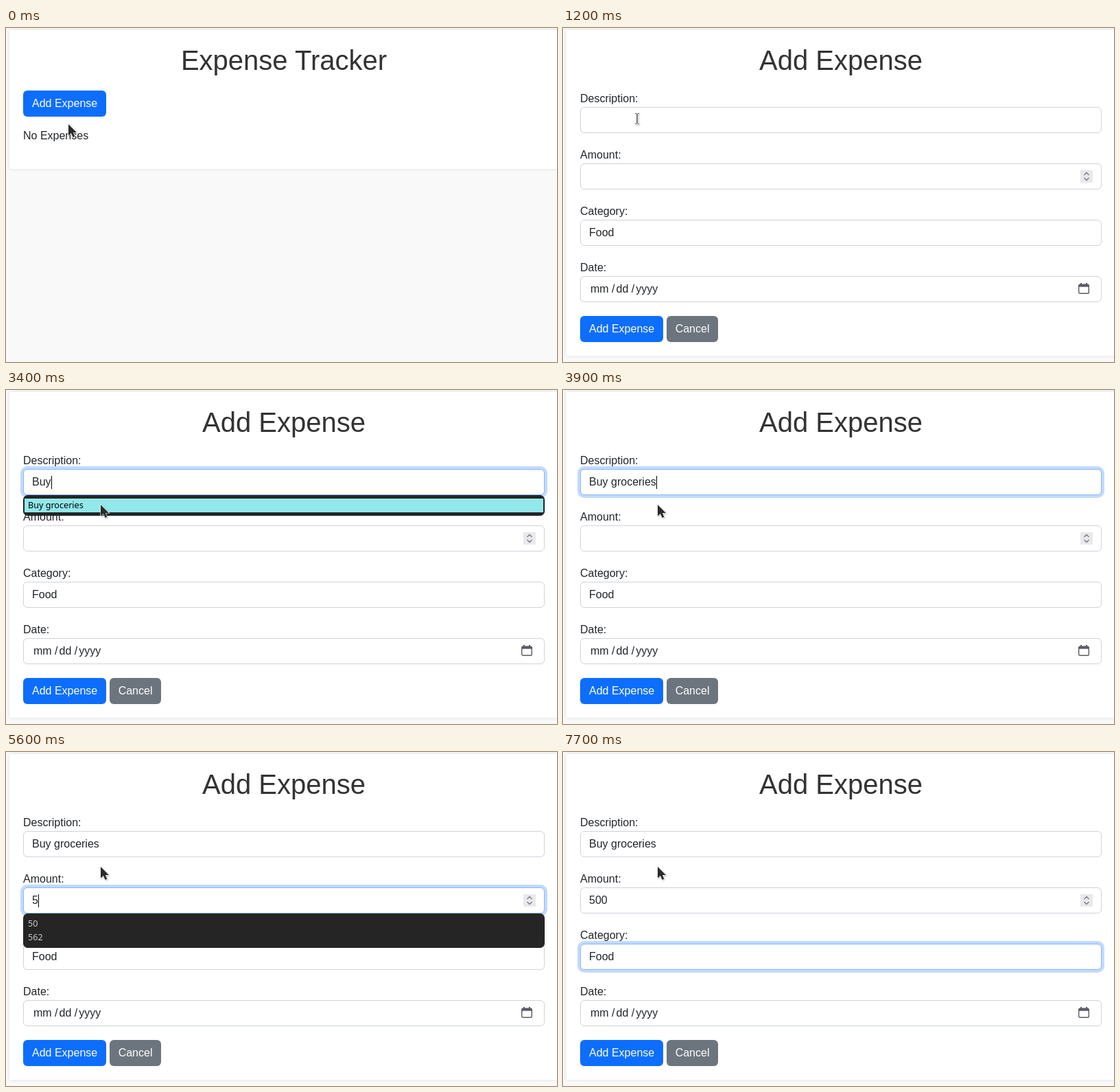
These frames come from a looping animation (803 px wide and 486 px high, 8 s). An HTML page:

```html
<!DOCTYPE html>
<html lang="en">
<head>
<meta charset="utf-8">
<title>Expense Tracker</title>
<style>
* { box-sizing: border-box; }
html, body { margin: 0; width: 100%; height: 100%; overflow: hidden; }
body {
  position: relative; background: #f9f9f9; color: #212529;
  font: 16px/24px "Liberation Sans", Arial, sans-serif;
}
.card {
  position: absolute; left: 5px; top: 3px; width: 800px; padding: 20px;
  background: #fff; box-shadow: 0 0 5px rgba(0, 0, 0, .1);
}
h1 { margin: 0 0 20px; font-size: 40px; line-height: 48px; font-weight: 400; color: #333; text-align: center; }
p { margin: 16px 0; }
.row { height: 38px; white-space: nowrap; }
.btn {
  display: inline-block; height: 38px; padding: 7px 13px; border-radius: 6px;
  background: #0d6efd; color: #fff; vertical-align: top;
}
.grey { background: #6c757d; }
.field {
  position: relative; display: flex; align-items: center; height: 38px; margin-bottom: 20px;
  padding: 0 12px; border: 1px solid #ced4da; border-radius: 6px; background: #fff; white-space: pre;
}
.caret { width: 1px; height: 19px; margin-top: 1px; background: #000; visibility: hidden; }
.slash { margin: 0 2px 0 4.4px; }
.icon { position: absolute; overflow: visible; }
.popup {
  position: absolute; left: 25px; width: 760px; padding: 5px 2px; border-radius: 7px;
  background: #252526; box-shadow: 0 0 1px rgba(0, 0, 0, .5);
  font: 12.6px/20px "Noto Sans", "Open Sans", sans-serif; color: #ccc;
}
.popup div { height: 20px; padding-left: 5px; line-height: 19px; }
.popup .on { background: #92e8ea; color: #000; }
.cursor { position: absolute; left: 0; top: 0; overflow: visible; filter: drop-shadow(1px 1px 1px rgba(0, 0, 0, .25)); }
</style>
</head>
<body>
<div class="card" id="home">
  <h1>Expense Tracker</h1>
  <div class="row"><span class="btn" id="add">Add Expense</span></div>
  <p>No Expenses</p>
</div>

<div class="card" id="form">
  <h1>Add Expense</h1>
  <div>Description:</div>
  <div class="field"><span></span><i class="caret"></i></div>
  <div>Amount:</div>
  <div class="field"><span></span><i class="caret"></i>
    <svg class="icon" style="left:728px;top:9px" width="18" height="18" fill="none" stroke="#77777c" stroke-width="1.3">
      <rect width="18" height="18" fill="#e9e9ed" stroke="none"/>
      <path d="M5.5 7 9 3.5 12.500 7M5.500 11 9 14.500 12.500 11"/>
    </svg>
  </div>
  <div>Category:</div>
  <div class="field"><span>Food</span></div>
  <div>Date:</div>
  <div class="field" style="padding-left:14px"><span>mm</span><span class="slash">/</span><span>dd</span><span class="slash">/</span><span>yyyy</span>
    <svg class="icon" style="left:725px;top:9px" width="16" height="16" fill="none" stroke="#5b5b66" stroke-width="1.4">
      <rect x=".7" y="2.200" width="14.600" height="13" rx="1.800"/>
      <path d="M1 4H15" stroke-width="3.400"/>
      <path d="M4 0V3M12 0V3" stroke-width="2"/>
    </svg>
  </div>
  <div class="row"><span class="btn">Add Expense</span> <span class="btn grey">Cancel</span></div>
</div>

<div class="popup" id="popup"></div>

<svg class="cursor" id="cursor" width="1" height="1">
  <path id="arrow" d="M0 0V16.500L3.900 13 6.600 19 9.400 17.800 6.800 12H12Z" fill="#2a2a2a" stroke="#fff" stroke-width="1.200" paint-order="stroke"/>
  <path id="hand" d="M-1.500 1Q0-1 1.500 1V7L8 8.500Q10 9 9.800 11L9 18H-1L-5 11.500Q-5-5 10-1.500 11Z" fill="#2a2a2a" stroke="#fff"/>
  <g id="beam" fill="none">
    <path d="M-2.500-7.500H2.500M-2.500 7.500H2.500M0-7V7" stroke="#fff" stroke-width="3"/>
    <path d="M-2.500-7.500H-.8M.8-7.500H2.500M-2.500 7.500H-.8M.8 7.500H2.500M0-7V7" stroke="#222" stroke-width="1.200"/>
  </g>
</svg>

<script>
const LOOP = 8000;
const $ = id => document.getElementById(id);
const fields = [...document.querySelectorAll('#form .field')];
const carets = [...document.querySelectorAll('.caret')];

const at = (shape, x, y) => ({ shape, x, y });
const groceries = on => ({ top: 153, rows: ['Buy groceries'], on });
const amounts = (...rows) => ({ top: 235, rows });

// Each step changes part of the running state; rings are focus amounts from 0 to 1.
const steps = [
  [0, { page: 'home', cursor: at('arrow', 91, 140), add: '#0d6efd', text: '', sum: '', caret: -1, popup: null, rings: [0, 0, 0] }],
  [100, { cursor: at('hand', 94, 124), add: '#0c66ea' }],
  [200, { cursor: at('hand', 97, 113), add: '#0b5ed7' }],
  [400, { add: '#0a58ca' }],
  [500, { page: 'form' }],
  [600, { cursor: at('arrow', 94, 112) }],
  [1200, { cursor: at('beam', 108, 132) }],
  [1300, { cursor: at('beam', 114, 134) }],
  [1500, { caret: 0, rings: [.3, 0, 0] }],
  [1600, { cursor: at('beam', 126, 146), rings: [.9, 0, 0] }],
  [1700, { cursor: at('arrow', 138, 167), rings: [1, 0, 0] }],
  [2500, { text: 'B', popup: groceries(false) }],
  [2700, { text: 'Bu' }],
  [2900, { text: 'Buy' }],
  [3400, { popup: groceries(true) }],
  [3700, { text: 'Buy groceries', popup: null, caret: -1 }],
  [3900, { caret: 0 }],
  [4800, { caret: 1, rings: [.5, .5, 0] }],
  [4900, { rings: [0, 1, 0] }],
  [5500, { sum: '5' }],
  [5600, { popup: amounts('50', '562') }],
  [5700, { sum: '50' }],
  [5800, { popup: amounts('50') }],
  [5900, { sum: '500' }],
  [6000, { popup: null, caret: -1 }],
  [7200, { caret: 1 }],
  [7500, { caret: -1, rings: [0, .8, .2] }],
  [7600, { rings: [0, .15, .85] }],
  [7700, { rings: [0, 0, 1] }]
];

const stateAt = t => Object.assign({}, ...steps.filter(s => s[0] <= t).map(s => s[1]));
const mix = (a, b, k) => `rgb(${a.map((v, i) => Math.round(v + (b[i] - v) * k))})`;

function drawPopup(popup) {
  const box = $('popup');
  box.style.display = popup ? 'block' : 'none';
  if (!popup) return;
  box.style.top = popup.top + 'px';
  box.replaceChildren(...popup.rows.map(text => {
    const row = document.createElement('div');
    row.textContent = text;
    row.className = popup.on ? 'on' : '';
    return row;
  }));
}

function draw(s) {
  for (const id of ['home', 'form']) $(id).style.display = s.page === id ? 'block' : 'none';
  $('add').style.background = s.add;
  fields[0].firstChild.textContent = s.text;
  fields[1].firstChild.textContent = s.sum;
  carets.forEach((c, i) => c.style.visibility = s.caret === i ? 'visible' : 'hidden');
  s.rings.forEach((k, i) => {
    fields[i].style.borderColor = mix([206, 212, 218], [134, 183, 254], k);
    fields[i].style.boxShadow = `0 0 0 ${4 * k}px rgba(13, 110, 253, ${.25 * k})`;
  });
  drawPopup(s.popup);
  const { shape, x, y } = s.cursor;
  for (const id of ['arrow', 'hand', 'beam']) $(id).style.display = shape === id ? 'inline' : 'none';
  $('cursor').style.transform = `translate(${x}px, ${y}px)`;
}

let shown = -1;
const start = performance.now();
function tick() {
  const t = (performance.now() - start) % LOOP;
  const count = steps.filter(s => s[0] <= t).length;
  if (count !== shown) draw(stateAt(t));
  shown = count;
  requestAnimationFrame(tick);
}
tick();
</script>
</body>
</html>
```
